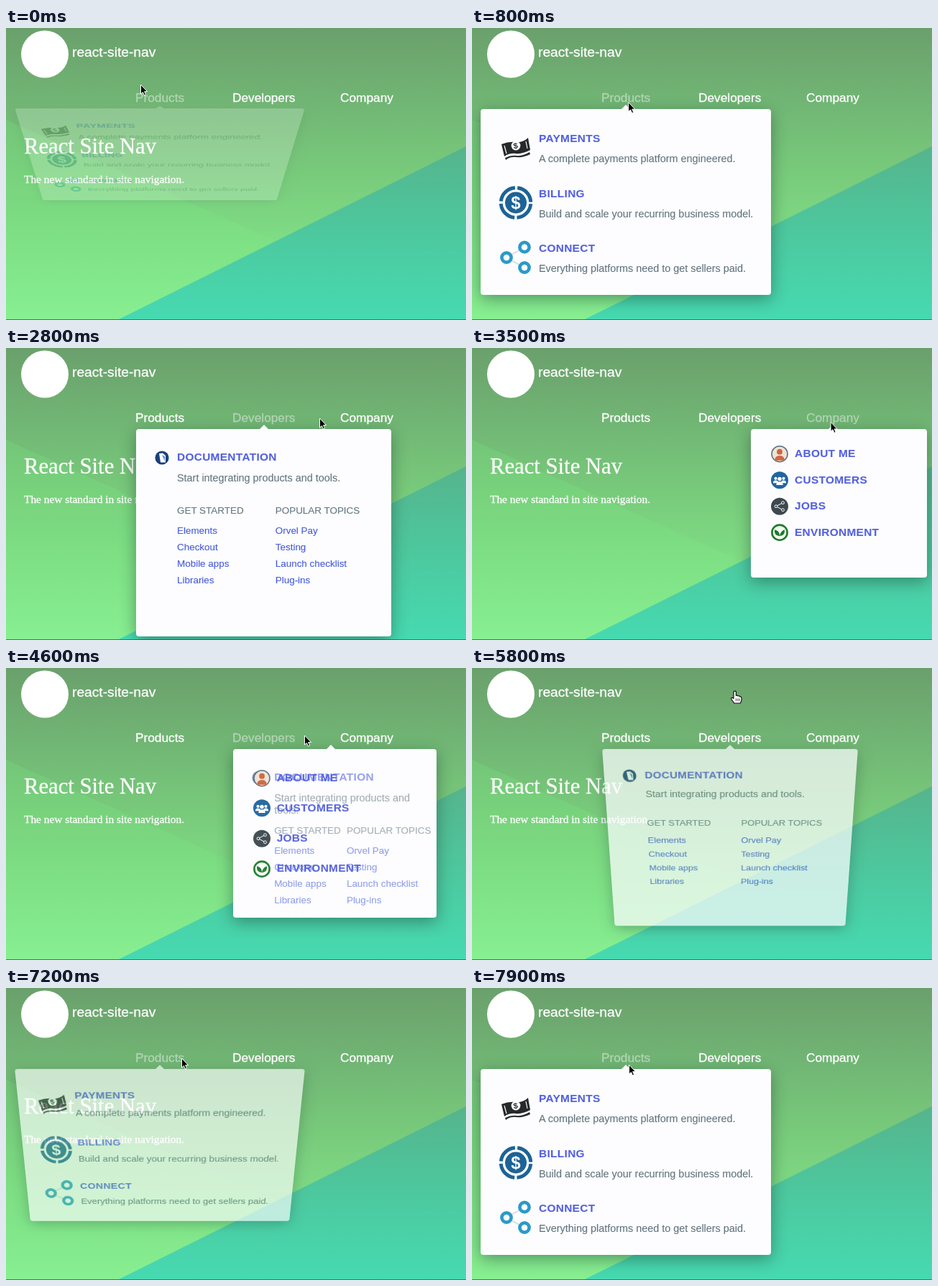
An HTML page with a canvas that plays this animation: 640 px wide and 407 px high, repeating every 8 s.

```html
<!DOCTYPE html>
<html lang="en">
<head>
<meta charset="utf-8">
<title>React Site Nav</title>
<style>
html, body { margin: 0; width: 100%; height: 100%; overflow: hidden; }
#stage { position: relative; width: 640px; height: 407px; overflow: hidden;
  font-family: "Liberation Sans", Arial, sans-serif; color: #fff; }
#stage canvas, #stage div, #stage svg { position: absolute; left: 0; top: 0; }
#stage svg { overflow: visible; }
.t { line-height: 20px; white-space: nowrap; -webkit-text-stroke: .3px currentColor; }
.serif { font-family: "Liberation Serif", Times, serif; }
#pop { background: #fdfdff; border-radius: 4px; transform-origin: 50% -2px;
  box-shadow: 0 6px 22px rgba(30, 60, 55, .48); }
#pop .t { -webkit-text-stroke-width: .12px; }
#tip { width: 0; height: 0; border: 7px solid transparent; border-top: 0; border-bottom: 7px solid #fdfdff; }
.head { font-weight: bold; font-size: 15.36px; letter-spacing: .35px; color: #5462de; }
.body { font-size: 14.4px; color: #62747f; }
.cap { font-size: 13.44px; color: #647783; }
.link { font-size: 13.44px; color: #465cd8; }
</style>
</head>
<body>
<div id="stage"><canvas id="bg" width="640" height="407"></canvas></div>
<script>
const LOOP = 8000, STEP = 100, FADE = 300, MORPH = 300;
const stage = document.getElementById('stage');

function box(parent, cls = '', id = '') {
  const el = document.createElement('div');
  el.className = cls;
  el.id = id;
  parent.append(el);
  return el;
}

// Text placed by its left edge and the middle of its capitals
function text(parent, str, x, mid, cls, size) {
  const el = box(parent, 't ' + cls);
  el.textContent = str;
  el.style.left = x + 'px';
  el.style.top = mid - 10 + 'px';
  if (size) el.style.fontSize = size + 'px';
  return el;
}

function icon(parent, x, y, shapes) {
  const ns = 'http://www.w3.org/2000/svg';
  const svg = document.createElementNS(ns, 'svg');
  svg.setAttribute('width', 1);
  svg.setAttribute('height', 1);
  svg.innerHTML = `<g transform="translate(${x} ${y})">${shapes}</g>`;
  parent.append(svg);
  return svg;
}

const disc = (x, y, r, fill, more = '') => `<circle cx="${x}" cy="${y}" r="${r}" fill="${fill}" ${more}/>`;
const path = (d, fill, more = '') => `<path d="${d}" fill="${fill}" ${more}/>`;
const dollar = (size, fill, y) =>
  `<text y="${y}" text-anchor="middle" font-family="Liberation Sans, sans-serif" font-weight="bold" font-size="${size}" fill="${fill}">$</text>`;
const person = (x, y, s, fill) =>
  `<g transform="translate(${x} ${y}) scale(${s})">${disc(0, -3, 2.6, fill)}${path('M-4.5 5Q-4.5 .5 0 .5T4.5 5Z', fill)}</g>`;
const ring = (x, y) => disc(x, y, 6.6, '#fdfdff', 'stroke="#2a9ac8" stroke-width="4.6"');

const art = {
  money: path('M-20-5Q-10-9 0-8T17-14L20 3Q9 9 0 8T-16 12Z', '#25292c') +
    path('M-15 14Q-7 10 1 11T19 6L20 9Q10 14 1 13T-14 17Z', '#25292c') +
    path('M-16-3L-13 8M14-9L16 1', 'none', 'stroke="#fff" stroke-width="1.2"') +
    disc(0, -3, 6.4, '#fff') + `<g transform="rotate(-10)">${dollar(11, '#25292c', 1)}</g>`,
  billing: disc(0, 0, 20.8, 'none', 'stroke="#1d6396" stroke-width="5" stroke-dasharray="29.2 3.47" stroke-dashoffset="-1.7"') +
    disc(0, 0, 15, '#1d6396') + dollar(24, '#fff', 8.5),
  connect: path('M12-14.5L-13 0L12 14', 'none', 'stroke="#d4dde2" stroke-width="2"') +
    ring(-13, 0) + ring(12, -14.5) + ring(12, 14),
  docs: disc(0, 0, 9.6, '#1b3f7a') + path('M-4-6L1-6.5L5-3V6.5H-2Z', '#fff') + path('M0-4L4 5V-2Z', '#5a8fd0'),
  about: disc(0, 0, 11, '#efe3d6', 'stroke="#5f7482" stroke-width="1.6"') + person(0, 1.5, 1.5, '#d0673f'),
  people: disc(0, 0, 12, '#21649f') + person(-5.5, 0, .8, '#fff') + person(5.5, 0, .8, '#fff') + person(0, 1.5, 1.05, '#fff'),
  share: disc(0, 0, 12, '#3d494f') + path('M4.5-5L-5 0L4.5 5', 'none', 'stroke="#fff" stroke-width="1"') +
    ['-5 0', '4.5 -5', '4.5 5'].map(p => disc(...p.split(' '), 1.9, '#3d494f', 'stroke="#fff"')).join(''),
  leaf: disc(0, 0, 10.6, '#f4fbf3', 'stroke="#1f7a2c" stroke-width="2.6"') +
    path('M0 5Q-8 4-7-4Q0-3 0 5Q1-2 7-4Q8 4 0 5Z', '#1f7a2c'),
  arrow: path('M.5 1V14L3.4 11.4L5.5 16L7.6 15.1L5.6 10.6H9.6Z', '#000', 'stroke="#fff" stroke-width="1"'),
  hand: path('M-2 0Q0-1.6 1.4 0V5.5Q3 4.4 4 6Q6 5.2 6.6 7Q9 6.4 9 9V12L7.4 16H-1.2L-5.4 10Q-5.6 7-2 9.4Z',
    '#fff', 'stroke="#111" stroke-width="1.2" stroke-linejoin="round"') +
    path('M1.4 9.5V13M3.8 9.5V13M6 9.5V13', 'none', 'stroke="#111" stroke-width=".8"')
};

function paintBackground() {
  const c = document.getElementById('bg').getContext('2d');
  const fade = (y0, y1, ...cols) => {
    const g = c.createLinearGradient(0, y0, 0, y1);
    cols.forEach((col, i) => g.addColorStop(i / (cols.length - 1), col));
    return g;
  };
  const poly = (fill, ...pts) => {
    c.fillStyle = fill;
    c.beginPath();
    pts.forEach(p => c.lineTo(...p));
    c.fill();
  };
  c.fillStyle = fade(0, 407, '#6ba06c', '#71b574', '#78cb7b', '#80de86', '#8bef95');
  c.fillRect(0, 0, 640, 407);
  poly('rgba(120,240,130,.2)', [0, 128], [375, 297], [157, 406], [0, 406]);
  poly(fade(165, 406, '#55b48d', '#4dc89e', '#46dab1'), [640, 165], [157, 406], [640, 406]);
  c.fillStyle = '#4b7563';
  c.fillRect(0, 406, 640, 1);
}

paintBackground();
icon(stage, 54, 36.5, disc(0, 0, 33, '#fff'));
text(stage, 'react-site-nav', 92, 33.6, '', 19.2);
text(stage, 'React Site Nav', 25, 164.6, 'serif', 30.7);
text(stage, 'The new standard in site navigation.', 25, 210.8, 'serif', 15.4);

const pop = box(stage, '', 'pop');
const tip = box(pop, '', 'tip');

// x, width, height of each panel; a is the pointer's centre
const menus = {
  products: { x: 12, w: 404, h: 259, a: 214 },
  developers: { x: 180.5, w: 355.5, h: 288.5, a: 358.5 },
  company: { x: 388, w: 245, h: 207, a: 502 }
};
for (const m of Object.values(menus)) m.el = box(pop);

const productRows = [
  ['PAYMENTS', 'A complete payments platform engineered.', 'money'],
  ['BILLING', 'Build and scale your recurring business model.', 'billing'],
  ['CONNECT', 'Everything platforms need to get sellers paid.', 'connect']
].map(([head, body, pic], i) => {
  const row = box(menus.products.el), y = i * 76.5;
  icon(row, 49, 54 + y, art[pic]);
  text(row, head, 81, 41 + y, 'head');
  text(row, body, 81, 69 + y, 'body');
  return row;
});

const docs = menus.developers.el;
icon(docs, 36, 40, art.docs);
text(docs, 'DOCUMENTATION', 57.5, 39, 'head');
const intro = text(docs, 'Start integrating products and tools.', 57.5, 69.5, 'body');
intro.style.whiteSpace = 'normal';
intro.style.lineHeight = '17px';
const [, topics] = [
  ['GET STARTED', 'Elements', 'Checkout', 'Mobile apps', 'Libraries'],
  ['POPULAR TOPICS', 'Orvel Pay', 'Testing', 'Launch checklist', 'Plug-ins']
].map(([cap, ...links]) => {
  const col = box(docs);
  text(col, cap, 57.5, 114, 'cap');
  links.forEach((s, i) => text(col, s, 57.5, 141.5 + i * 23.1, 'link'));
  return col;
});

const companyRows = [
  ['ABOUT ME', 'about'], ['CUSTOMERS', 'people'], ['JOBS', 'share'], ['ENVIRONMENT', 'leaf']
].map(([head, pic], i) => {
  const row = box(menus.company.el), y = 34.2 + i * 36.5;
  icon(row, 40, y + .5, art[pic]);
  text(row, head, 61, y, 'head');
  return row;
});

const tabs = {
  products: text(stage, 'Products', 180, 97, '', 17.28),
  developers: text(stage, 'Developers', 315, 97, '', 17.28),
  company: text(stage, 'Company', 465, 97, '', 17.28)
};
const arrow = icon(stage, 0, 0, art.arrow);
const hand = icon(stage, 0, 0, art.hand);

// Time, menu hovered from then on, menu it replaces
const hovers = [
  [-63, 'products', null], [1415, 'developers', 'products'], [2850, 'company', 'developers'],
  [4533, 'developers', 'company'], [5715, null, 'developers'], [7006, 'products', null]
];
// Pointer: time, x, y
const track = [
  [0, 187, 78], [300, 205, 99], [1000, 222, 104], [1350, 262, 98], [1700, 314, 97], [2000, 345, 102],
  [2500, 375, 102], [2800, 436, 97], [3100, 490, 100], [3800, 505, 104], [4300, 470, 98], [4600, 415, 93],
  [4900, 372, 96], [5400, 360, 90], [5700, 365, 56], [5800, 366, 33], [6200, 350, 32], [6600, 270, 52],
  [7000, 238, 86], [7200, 244, 97], [7500, 228, 104], [7900, 218, 106]
];

const clamp = v => Math.max(0, Math.min(1, v));
const mix = (a, b, k) => a + (b - a) * k;

// cubic-bezier(.25, .1, .25, 1)
function ease(t) {
  if (t <= 0 || t >= 1) return clamp(t);
  let lo = 0, hi = 1;
  for (let i = 0; i < 24; i++) {
    const u = (lo + hi) / 2, v = 1 - u;
    if (.75 * v * u + u * u * u < t) lo = u; else hi = u;
  }
  return .3 * (1 - lo) ** 2 * lo + 3 * (1 - lo) * lo * lo + lo ** 3;
}

function pointer(t) {
  const i = track.findIndex(p => p[0] > t);
  if (i < 0) return track[track.length - 1].slice(1);
  const a = track[i - 1], b = track[i], k = (t - a[0]) / (b[0] - a[0]);
  return [mix(a[1], b[1], k), mix(a[2], b[2], k)];
}

function layout(x, w, h, a) {
  Object.assign(pop.style, { left: x + 'px', top: '113px', width: w + 'px', height: h + 'px' });
  Object.assign(tip.style, { left: a - x - 7 + 'px', top: '-6px' });
  productRows.forEach((r, i) => {
    r.style.left = (w - 404) / 2 + 'px';
    r.style.top = (i + 1) * (h - 259) / 4 + 'px';
  });
  companyRows.forEach((r, i) => r.style.top = (i + 1) * (h - 207) / 5 + 'px');
  intro.style.width = w - 80 + 'px';
  topics.style.left = (w - 82) / 2 + 'px';
}

function draw(t) {
  const [start, now, before] = hovers.filter(s => s[0] <= t).pop();
  const e = t - start;
  const to = menus[now || before], from = menus[now && before] || to;
  const k = ease(e / MORPH);
  layout(...['x', 'w', 'h', 'a'].map(p => mix(from[p], to[p], k)));

  for (const m of Object.values(menus)) {
    let o = 0;
    if (m === to) o = from === to ? 1 : clamp(e / 115);
    else if (m === from) o = clamp(1 - (e / 320) ** 2);
    m.el.style.opacity = o;
  }

  const shown = !now ? clamp(1 - e / FADE) : before ? 1 : clamp(e / FADE);
  pop.style.opacity = shown;
  pop.style.visibility = shown ? 'visible' : 'hidden';
  pop.style.transform = shown < 1 ? `perspective(850px) rotateX(${-66 * (1 - shown)}deg)` : 'none';

  for (const name in tabs) tabs[name].style.opacity = name === now ? .45 : 1;

  const [x, y] = pointer(t), over = y < 55;
  arrow.style.display = over ? 'none' : '';
  hand.style.display = over ? '' : 'none';
  for (const c of [arrow, hand]) c.style.transform = `translate(${x}px, ${y}px)`;
}

const begin = performance.now();
function tick() {
  const t = Math.max(0, performance.now() - begin) % LOOP;
  draw(Math.floor(t / STEP) * STEP);
  requestAnimationFrame(tick);
}
tick();
</script>
</body>
</html>
```
